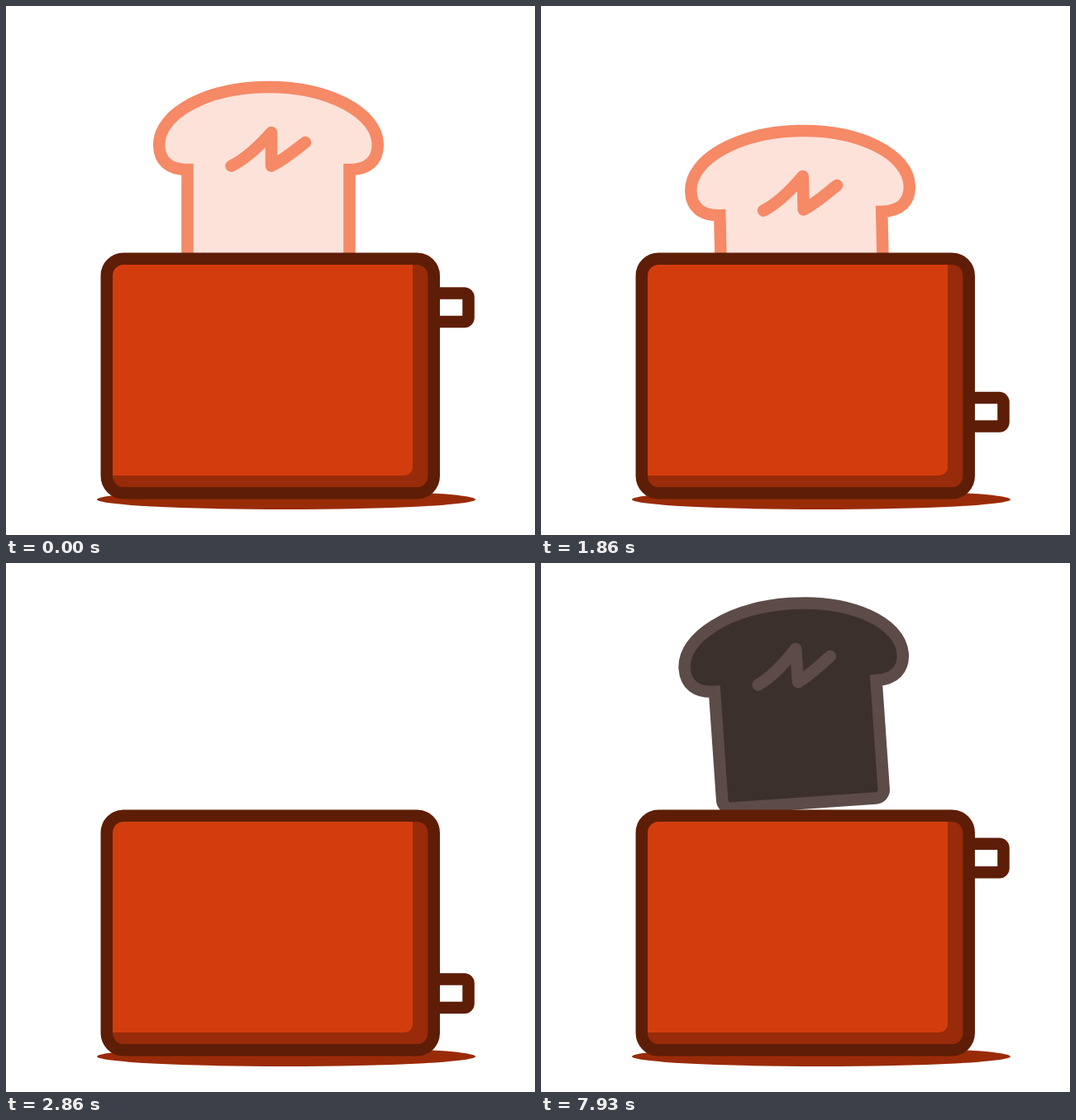
An HTML page for the animation above (8 s loop, 640 by 640 pixels).

```html
<!DOCTYPE html>
<html lang="en">
<head>
<meta charset="utf-8">
<title>Toaster</title>
<style>
  html, body { margin: 0; height: 100%; overflow: hidden; background: #fff; }
  svg { display: block; width: 100%; height: 100%; }
  #bread { fill: #fde2da; stroke: #f68966; }
  #bread.burnt { fill: #3b302c; stroke: #5c4b47; }
</style>
</head>
<body>
<svg viewBox="0 0 640 640" fill="none" stroke-width="14.5">
  <clipPath id="slot"><path d="M0 0H640V310H0z"/></clipPath>
  <ellipse cx="339" cy="597" rx="229" ry="12" fill="#9a2b08"/>
  <g clip-path="url(#slot)">
    <g id="bread">
      <path d="M219.5 198C197 198 185.2 187 185.2 168C185.2 129.4 244.5 98 317.5 98S449.8 129.4 449.8 168C449.8 187 438 198 415.5 198V330a10 10 0 0 1-10 10H229.5a10 10 0 0 1-10-10z"/>
      <path d="M272.5 193.5C288 186 305 171 321 153V193.5C336 186 350 174 362 165" fill="none" stroke-linecap="round" stroke-linejoin="round"/>
    </g>
  </g>
  <path id="lever" d="M518 347.5H554.5a5 5 0 0 1 5 5V377a5 5 0 0 1-5 5H518" stroke="#5e1d06"/>
  <rect x="121.8" y="305.7" width="395.9" height="283.6" rx="20.5" fill="#982b09"/>
  <path d="M127 311H492V558a10 10 0 0 1-10 10H127z" fill="#d33d0e"/>
  <rect x="121.8" y="305.7" width="395.9" height="283.6" rx="20.5" stroke="#5e1d06"/>
</svg>
<script>
const LOOP = 8000, FPS = 14;
const bread = document.getElementById('bread');
const lever = document.getElementById('lever');

// Progress 0..1 along cubic-bezier(x1, 0, x2, 1); the default is smoothstep.
function ease(t, start, duration, x1 = 1 / 3, x2 = 2 / 3) {
  const x = Math.min(1, Math.max(0, (t - start) / duration));
  let low = 0, high = 1, s = 0.5;
  for (let i = 0; i < 20; i++) {
    s = (low + high) / 2;
    const w = 1 - s;
    if (3 * w * w * s * x1 + 3 * w * s * s * x2 + s ** 3 < x) low = s;
    else high = s;
  }
  return s * s * (3 - 2 * s);
}

function draw(now) {
  // Whole steps; the small lead absorbs times rounded to 10 ms.
  const t = Math.floor((now % LOOP + 5) * FPS / 1000) * 1000 / FPS;

  const press = ease(t, 1270, 820, 0.875, 0.514);
  const settle = ease(t, 2090, 200);
  const drop = ease(t, 1250, 1000, 0.981, 0.712);
  const hop = ease(t, 2250, 350);
  const sink = ease(t, 2600, 400);
  const pop = ease(t, 7240, 820, 0.875, 0.514);

  const leverY = 173 * press - 17 * settle - 173 * pop;
  const breadY = 230 * drop - 46 * hop + 41 * sink - 290 * pop;
  const tilt = -5.75 * drop + 11.25 * hop - 5.5 * sink - 4.2 * pop;

  lever.setAttribute('transform', `translate(0 ${leverY})`);
  bread.setAttribute('transform', `translate(0 ${breadY}) rotate(${tilt} 317.5 338)`);
  bread.classList.toggle('burnt', t > 5000);
}

const start = performance.now();
function tick() {
  draw(performance.now() - start);
  requestAnimationFrame(tick);
}
tick();
</script>
</body>
</html>
```
